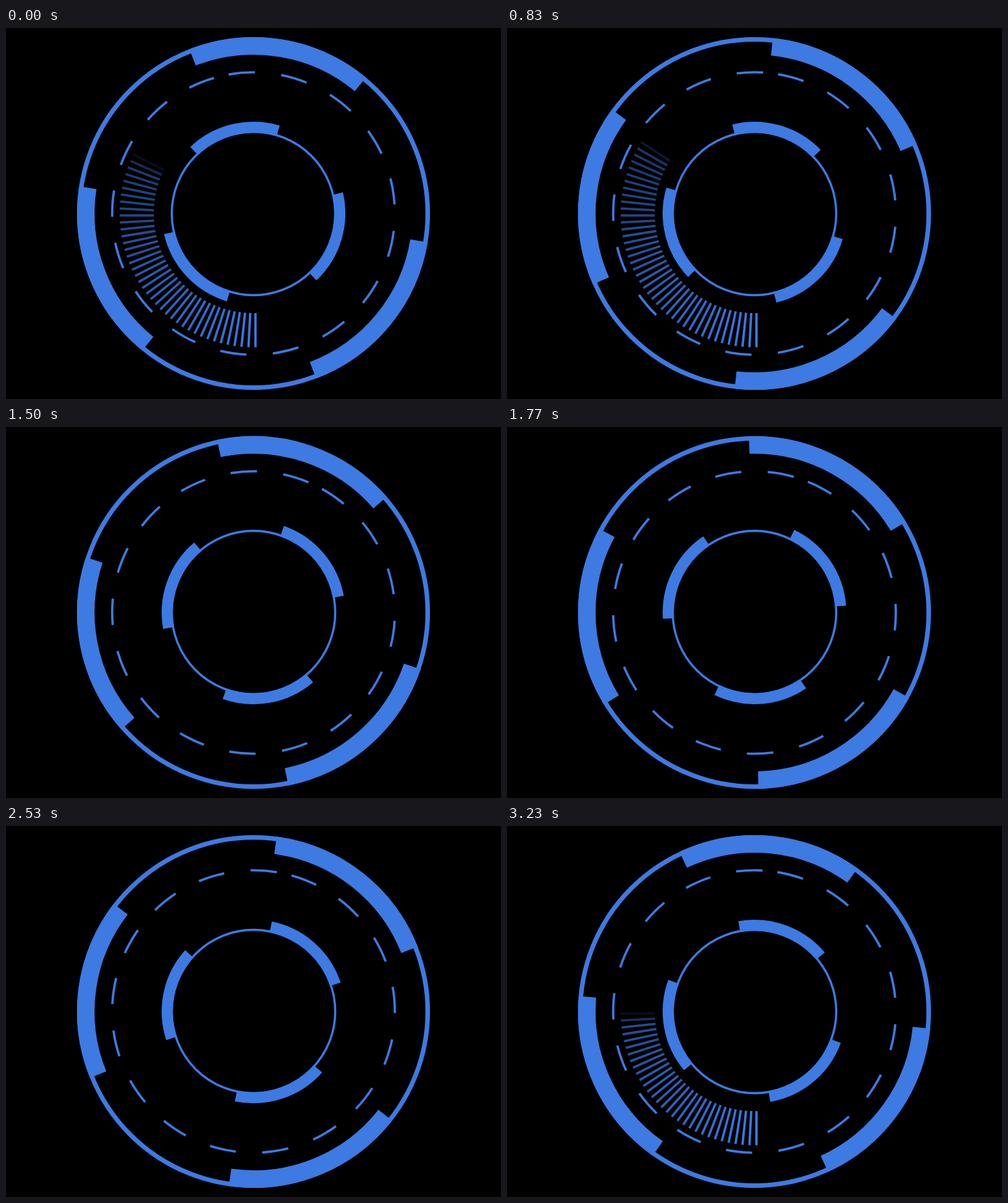
An HTML page with a canvas for the animation above (3260 ms loop, 760 px wide and 570 px high).

```html
<!DOCTYPE html>
<html lang="en">
<head>
<meta charset="utf-8">
<title>Dial</title>
<style>
  html, body { margin: 0; width: 100%; height: 100%; overflow: hidden; background: #000; }
  canvas { display: block; width: 760px; height: 570px; }
</style>
</head>
<body>
<canvas id="stage" width="760" height="570"></canvas>
<script>
const ctx = document.getElementById('stage').getContext('2d');
const BLUE = '#3d7ae2';
const LOOP = 3260;
const RAD = Math.PI / 180;

const swing = u => (1 - Math.cos(Math.PI * u)) / 2;
const square = u => u * u;

// Turning points as [ms, value, easing into it]; angles run clockwise from the top.
const outer = tween([-150, 5.8], [600, 39.8], [1480, 18.4], [2200, 48], [3230, 5.2]);
const inner = tween([-40, -13.5], [1900, 56.5], [3350, 19.3]);
const dashes = tween([0, -4.8], [1240, 38.9, square], [1850, 27], [3230, 14.7]);
const ticks = tween([0, 39.5], [480, 49.3], [1396, 0, square], [2600, 0], [3230, 30.4]);

function tween(...keys) {
  return t => {
    let i = 1;
    while (i < keys.length - 1 && t > keys[i][0]) i++;
    const [t0, v0] = keys[i - 1], [t1, v1, ease = swing] = keys[i];
    return v0 + (v1 - v0) * ease(Math.min(1, (t - t0) / (t1 - t0)));
  };
}

// A circle; with a dash angle, dashes and equal gaps run from the start angle.
function ring(r, width, start = 0, dash = 0) {
  const from = (start - 90) * RAD;
  ctx.lineWidth = width;
  ctx.setLineDash(dash ? [dash * RAD * r, dash * RAD * r] : []);
  ctx.beginPath();
  ctx.arc(0, 0, r, from, from + 2 * Math.PI);
  ctx.stroke();
}

function drawTicks(head) {
  for (let k = 0; k < head; k++) {
    ctx.save();
    ctx.rotate(k * 3 * RAD);
    ctx.globalAlpha = (1 - k / 72) * Math.min(1, (head - k) / 2);
    ctx.fillRect(1.2, 153, 3.6, 52.5);
    ctx.restore();
  }
}

function draw(t) {
  ctx.setTransform(1, 0, 0, 1, 0, 0);
  ctx.fillStyle = '#000';
  ctx.fillRect(0, 0, 760, 570);
  ctx.translate(380, 285);
  ctx.fillStyle = ctx.strokeStyle = BLUE;

  ring(267.5, 7);
  ring(257.5, 27, outer(t) - 29.3, 59.8);
  ring(125.5, 3.4);
  ring(132.5, 17, inner(t) - 30.05, 60.05);
  ring(217, 3.6, dashes(t) - 5.35, 10.72);
  drawTicks(ticks(t));
}

const start = performance.now();
function frame(now) {
  const t = Math.max(0, now - start) % LOOP;
  draw(Math.floor((t + 4) * 0.03) / 0.03);   // 30 pictures a second
  requestAnimationFrame(frame);
}
draw(0);
requestAnimationFrame(frame);
</script>
</body>
</html>
```
